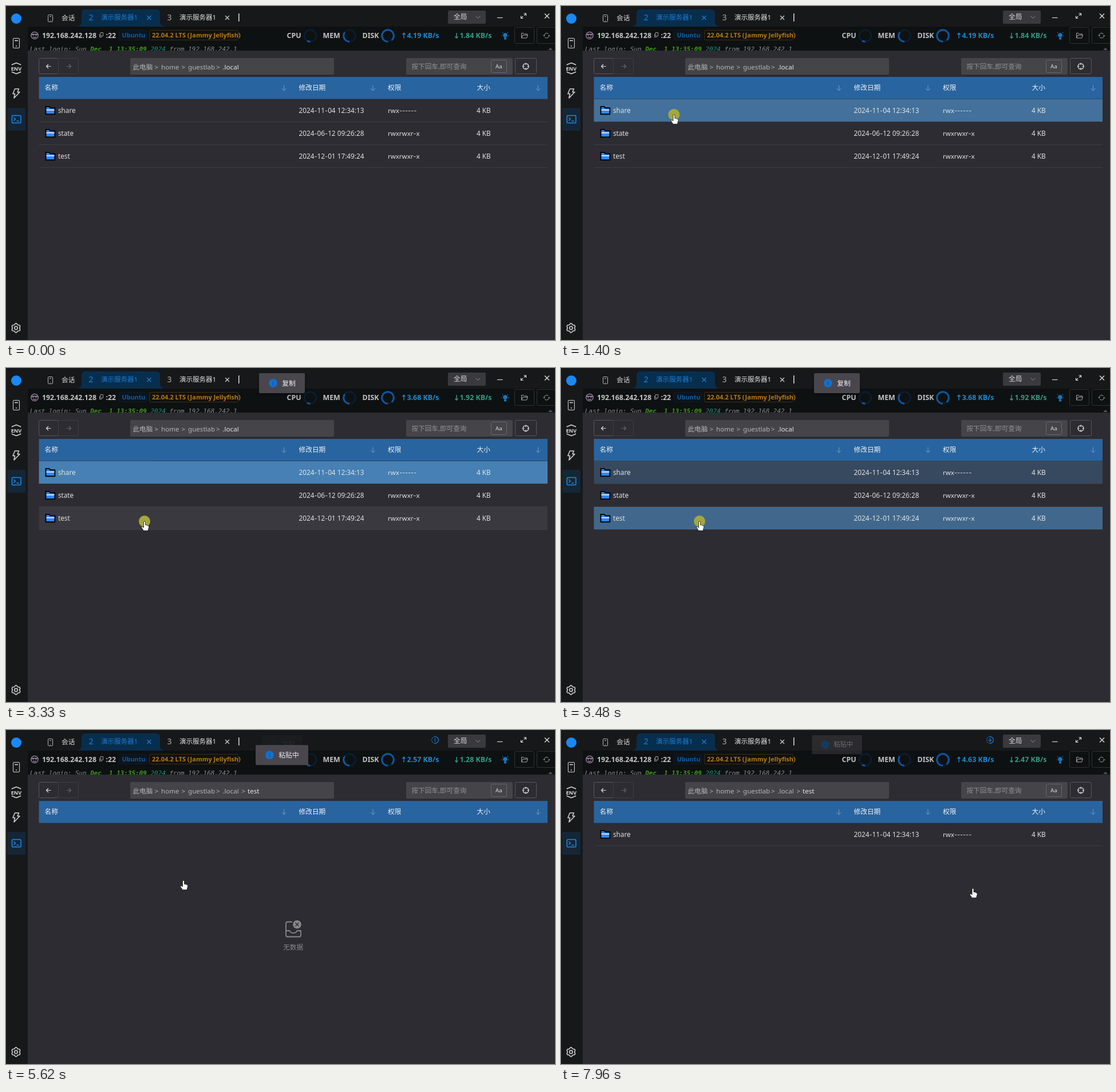
Animation of 959x584 px, one loop 8 s. Source, as an HTML page:

```html
<!DOCTYPE html>
<html lang="zh-CN">
<head>
<meta charset="utf-8">
<title>文件管理</title>
<style>
  html, body { margin: 0; width: 100%; height: 100%; overflow: hidden; background: #2d2c32; }
  svg { display: block; width: 959px; height: 584px; }
  text { font-family: "Noto Sans", "Noto Sans CJK SC", sans-serif; white-space: pre; }
  .mono { font-family: "DejaVu Sans Mono", monospace; font-style: italic; }
  .dash { font-family: Inter, sans-serif; font-size: 11px; }
</style>
</head>
<body>
<svg id="stage" viewBox="0 0 959 584"></svg>
<script>
const LOOP = 8000;
const ROW_TOP = 163, ROW_H = 40;

// Markup helpers
const rect = (x, y, w, h, fill, more = '') =>
  `<rect x="${x}" y="${y}" width="${w}" height="${h}" fill="${fill}" ${more}/>`;
const frame = (x, y, w, h, color, r = 2, fill = 'none') =>
  rect(x + .5, y + .5, w - 1, h - 1, fill, `rx="${r}" stroke="${color}"`);
const text = (x, y, s, size = 11.7, fill = '#e2e2e4', more = '') =>
  `<text x="${x}" y="${y}" font-size="${size}" fill="${fill}" ${more}>${s}</text>`;
const line = (d, color, w = 1.2, more = '') =>
  `<path d="${d}" fill="none" stroke="${color}" stroke-width="${w}" stroke-linejoin="round" ${more}/>`;
const circle = (x, y, r, fill, more = '') =>
  `<circle cx="${x}" cy="${y}" r="${r}" fill="${fill}" ${more}/>`;
const group = (id, inner, more = '') => `<g id="${id}" ${more}>${inner}</g>`;
const cross = (x, y, r, color, w = 1.2) =>
  line(`M${x - r} ${y - r}l${2 * r} ${2 * r}M${x + r} ${y - r}l${-2 * r} ${2 * r}`, color, w);
const wideDashes = s => s.replace(/-+/g, '<tspan class="dash">$&</tspan>');
const bold = 'font-weight="700"';

function gear(x, y) {
  const points = Array.from({ length: 48 }, (_, i) => {
    const a = i * Math.PI / 24, r = 7.1 + .9 * Math.cos(6 * a);
    return `${(x + r * Math.sin(a)).toFixed(2)} ${(y - r * Math.cos(a)).toFixed(2)}`;
  });
  return line(`M${points.join('L')}Z`, '#d8d8da', 1.5) +
    circle(x, y, 2.7, 'none', 'stroke="#d8d8da" stroke-width="1.5"');
}

function sidebar() {
  const ink = '#d6d6d8';
  return rect(0, 36, 38, 548, '#17181a') +
    circle(18, 22, 9, '#1989f5') +
    frame(12, 56, 12, 18, ink, 1.5) + line('M15 60.5h6M17 70h2', ink, 1.5) +
    line('M10.5 103.500v-1l7.500-3 7.500 3v1M10.500 114.500v1l7.500 3 7.500-3v-1', ink, 1.4) +
    text(18, 112.6, 'ENV', 9.2, ink, bold + ' text-anchor="middle"') +
    line('M15.500 145h7l-2.500 5.500h4L14 161l1.500-7.500h-3.500Z', ink, 1.5) +
    rect(2, 178, 32, 40, '#152636', 'rx="2"') +
    rect(10.500, 191.500, 15.500, 13, 'none', 'rx="1.5" stroke="#1d8cf0" stroke-width="1.5"') +
    line('M13.500 195l3 2.800-3 2.800M18.500 201.300h4', '#1d8cf0', 1.4) +
    gear(17.500, 563);
}

function titleBar() {
  const pale = '#d4d4d6', blue = '#1b7fd4';
  return rect(0, 0, 959, 36, '#17181a') +
    frame(73, 15, 9, 13, '#bbb', 1) + line('M76 18.500h3M77 25h1', '#bbb') +
    text(97, 25.300, '会话', 11.700, pale) +
    `<path d="M124 36Q132 35 132 27V13Q132 6 139 6H262Q269 6 269 13V27Q269 35 277 36Z" fill="#082e4e"/>` +
    text(144.500, 25, '2', 14, blue) + text(166, 24.300, '演示服务器1', 11.500, blue) + cross(250, 20.500, 3.500, blue) +
    text(281.500, 25, '3', 14, '#aaa') + text(303, 24.300, '演示服务器1', 11.500, '#e4e4e6') + cross(386.500, 20.500, 3.500, pale) +
    rect(406, 13, 1.500, 14, '#dedee0') +
    rect(772, 8, 66, 23, '#3a3a3e', 'rx="2"') + text(782, 23.300, '全局', 11.700, '#dcdcde') +
    line('M820.500 17.500l4 4 4-4', '#8c8c90', 1) +
    line('M858 20.500h9.500', pale) +
    line('M904.500 13h4v4M908.500 13l-3.500 3.500M903.500 21.500h-4v-4M899.500 21.500l3.500-3.500', pale) +
    cross(945, 17.500, 4, '#e4e4e6', 1.300);
}

function gauge(label, x, cx, share) {
  const length = 2 * Math.PI * 10.300;
  const ring = 'stroke-width="3" stroke=';
  return text(x, 55.500, label, 12.400, '#c2c4c4', bold) +
    circle(cx, 52, 10.300, 'none', ring + '"#0a1d31"') +
    circle(cx, 52, 10.300, 'none', ring + `"#0f56a0" stroke-dasharray="${share * length} ${length}" transform="rotate(90 ${cx} 52)"`);
}

function statusBar() {
  const mono = (x, s, color, more = '') => text(x, 78.500, s, 10.930, color, 'class="mono" ' + more);
  return rect(38, 36, 921, 42, '#0e1111') +
    mono(42, 'Last login: Sun', '#8b8d8c') + mono(147.200, 'Dec  1 13:35:09', '#3f9e1b', bold) +
    mono(252.500, '2024', '#16977f') + mono(285.400, 'from 192.168.242.1', '#8b8d8c') +
    circle(50, 51.500, 6.200, 'none', 'stroke="#a58bb0" stroke-width="1.3"') +
    line('M44 49.500h12M46.500 51h2M51.500 51h2M47 54q3 2.500 6 0', '#a58bb0', 1.300) +
    text(63, 55.500, '192.168.242.128', 12.300, '#c6c8c8', bold) +
    line('M163.500 49v5.500h4M165 46.500h4.500v6H165Z', '#999', 1) +
    text(174.500, 55.500, ':22', 12.300, '#c6c8c8', bold) +
    frame(197, 42, 49, 18, '#0b1c2e', 2, '#0b151e') + text(202.500, 55, 'Ubuntu', 10.800, '#105c9e', 'font-weight="600"') +
    frame(250, 42, 156, 18, '#3d2d17', 2, '#12110f') +
    text(255, 55, '22.04.2 LTS (Jammy Jellyfish)', 11, '#b57a14', 'font-weight="600"') +
    gauge('CPU', 490.500, 531.500, .09) + gauge('MEM', 553.500, 600, .35) + gauge('DISK', 622.500, 667, .88) +
    line('M695 56.500v-9M692.500 50l2.500-2.700 2.500 2.700', '#148bdb', 1.400) +
    line('M787 47v9M784.500 53.500l2.500 2.700 2.500-2.700', '#2f9e86', 1.400) +
    text(700.500, 55.500, '', 12.400, '#148bdb', bold + ' id="up"') +
    text(792.500, 55.500, '', 12.400, '#2f9e86', bold + ' id="down"') +
    circle(872, 51, 3.800, '#1477c4') + rect(870, 55, 4, 3.500, '#1477c4') +
    line('M865.500 52h1.500M877 52h1.500M867 46l1.200 1.200M877 46l-1.200 1.200', '#1477c4') +
    frame(888, 37, 35, 29, '#2e3232') + frame(927, 37, 40, 29, '#2e3232') +
    line('M900.500 56v-8.500h3.500l1.500 1.500h5v2M900.500 56l2-5h9l-2 5Z', '#a4a6a6', 1) +
    line('M940 52.500a4.300 4.300 0 0 1 7.500-3.500M948.600 51a4.300 4.300 0 0 1-7.500 3.500M938.500 51.200l1.500 1.500 1.500-1.500M947.200 52.500l1.500-1.500 1.500 1.500', '#a4a6a6', 1);
}

function toolbar() {
  const crumbs = [[221.500, '此电脑'], [259.500, '&gt;'], [271, 'home'], [306.500, '&gt;'], [318, 'guestlab'], [367, '&gt;']];
  const dim = '#b4b4b8';
  return rect(38, 78, 921, 506, '#2d2c32') + `<path d="M947 77l4-4 4 4Z" fill="#555"/>` +
    frame(57, 91, 35, 28, '#57565c') + frame(91, 91, 36, 28, '#3e3d43') +
    line('M78.500 105.500h-8M74 102l-3.500 3.500 3.500 3.500', '#dededf') +
    line('M105.500 105.500h8M110 102l3.500 3.500-3.500 3.500', '#65646a') +
    rect(217, 91, 356, 29, '#454449', 'rx="2"') +
    crumbs.map(([x, s]) => text(x, 110.500, s, 11.600, dim)).join('') +
    text(378.500, 110.500, '.local', 11.600, dim, 'id="local"') +
    group('subdir', text(411.500, 110.500, '&gt;', 11.600, dim) + text(422, 110.500, 'test', 11.600, '#e6e6e8')) +
    rect(699, 91, 186, 29, '#454449', 'rx="2"') + text(708.500, 109.500, '按下回车,即可查询', 11.600, '#929196') +
    frame(847, 94, 28, 23, '#68676d') + text(861, 109, 'Aa', 9.800, '#dededf', 'text-anchor="middle"') +
    frame(889, 91, 38, 28, '#57565c') +
    circle(908, 105.500, 4.900, 'none', 'stroke="#dededf" stroke-width="1.2"') +
    line('M908 99.500v3.500M908 108v3.500M902 105.500h3.500M910.500 105.500h3.500', '#dededf');
}

function tableHead() {
  const arrow = x => line(`M${x} 138.500v9.500M${x - 4} 144l4 4 4-4`, '#6f9cc7', 1);
  const titles = [[67.500, '名称'], [511.500, '修改日期'], [667, '权限'], [822.500, '大小']];
  return rect(57.500, 124, 888.500, 38.500, '#28649f') +
    titles.map(([x, s]) => text(x, 147.300, s, 11.700, '#f2f4f6', 'font-weight="500"')).join('') +
    [485.500, 641, 929.500].map(arrow).join('');
}

function tableRow([name, date, mode], i) {
  const y = ROW_TOP + i * ROW_H, base = y + 23.500;
  return group('row' + i,
    rect(57.500, y, 888.500, ROW_H - 1, '#3a393f', `id="hover${i}"`) +
    rect(57.500, y, 888.500, ROW_H - 1, '#4680b4', `id="pick${i}"`) +
    rect(57.500, y + ROW_H - 1, 888.500, 1, '#3d3c43') +
    `<path d="M69.500 ${y + 13}h6l2 2.300h7.800v11H69.500Z" fill="#2f88ff" stroke="#050505" stroke-width="2" stroke-linejoin="round"/>` +
    rect(70.500, y + 18, 14, 1.500, '#fff') +
    text(91, base, name, 11.700) + text(511.500, base, wideDashes(date), 11.800) +
    text(667, base, wideDashes(mode), 11.500) + text(822, base, '4 KB', 11.800));
}

function emptyNote() {
  const gray = '#88878c';
  return group('empty',
    line('M500 335.500h-8q-3 0-3 3v20q0 3 3 3h20q3 0 3-3v-8M489 351h6.500q1.500 4 6.500 4t6.500-4h6.500', gray, 1.800) +
    circle(508.500, 340, 7.300, gray) + cross(508.500, 340, 3, '#2d2c32', 1.400) +
    text(484, 384, '无数据', 11.700, gray));
}

function toast(id, label, width) {
  const left = -width / 2;
  return group(id,
    rect(left, 0, width, 35, '#48474d', 'rx="2" filter="url(#shadow)"') +
    circle(left + 24.500, 17.500, 7.300, '#1270d2') +
    rect(left + 23.800, 13.200, 1.400, 1.600, '#48474d') + rect(left + 23.800, 16, 1.400, 5.500, '#48474d') +
    text(left + 40.300, 21.500, label, 11.800, '#ececee'));
}

function downloadIcon() {
  const d = (id, path, dash) => line(path, '#1478d4', 2, `id="${id}" stroke-linecap="round" stroke-dasharray="${dash}"`);
  return group('download',
    d('solid', 'M12 3a9 9 0 0 1 0 18', '29 40') + d('dashed', 'M12 21a9 9 0 0 1 0-18', '2 4') +
    d('shaft', 'M12 8v7.5', '8 20') + d('headL', 'M12 15.5l-3.500-3.500', '6 20') + d('headR', 'M12 15.5l3.500-3.500', '6 20'),
    'transform="translate(741.7 9.6) scale(.65)"');
}

const files = [
  ['share', '2024-11-04 12:34:13', 'rwx------'],
  ['state', '2024-06-12 09:26:28', 'rwxrwxr-x'],
  ['test', '2024-12-01 17:49:24', 'rwxrwxr-x']
];

const stage = document.getElementById('stage');
stage.innerHTML =
  '<defs><filter id="shadow" x="-20%" y="-40%" width="140%" height="200%"><feDropShadow dx="0" dy="2" stdDeviation="3" flood-opacity=".35"/></filter></defs>' +
  titleBar() + sidebar() + statusBar() + toolbar() + tableHead() + files.map(tableRow).join('') + emptyNote() +
  downloadIcon() + toast('copyToast', '复制', 80) + toast('pasteToast', '粘贴中', 92) +
  circle(0, 0, 10, '#a3a73e', 'id="click"') +
  group('hand', '<path d="M-1.500 1.500Q-1.500 0 0 0T1.500 1.500V6.500Q4 5.800 4.300 7.200Q6.200 6.600 6.600 8.200Q8 8.200 7.600 10.500L6 16.500H-1.500L-5.300 11Q-5.600 9 -3.400 9.500L-1.500 11Z" fill="#fff" stroke="#111" stroke-width=".8"/>');

const el = {};
stage.querySelectorAll('[id]').forEach(node => el[node.id] = node);

// Timeline tables
const cursorPath = [
  [0, 775, 592], [70, 751, 574], [140, 655, 515], [205, 520, 425], [270, 390, 356], [340, 322, 329],
  [540, 322, 329], [700, 278, 280], [850, 222, 214], [990, 199, 185],
  [1270, 199, 185], [1430, 197, 191], [2600, 197, 191], [2880, 226, 254], [3030, 241, 275], [3130, 242, 268],
  [3600, 242, 268], [3800, 285, 331], [3940, 304, 290], [4060, 310, 263],
  [5700, 310, 263], [6050, 440, 298], [6410, 690, 312],
  [6500, 740, 310], [6850, 922, 302], [7280, 738, 291], [7500, 730, 288], [7800, 719.500, 277]
];
const clicks = [[1290, 1410], [3330, 3400], [3450, 3510], [4200, 4310]];
const rates = [[0, '4.19', '1.84'], [1830, '3.68', '1.92'], [3860, '2.57', '1.28'], [5860, '4.63', '2.47']];
const OPENED = 3510, PASTED = 6720, DOWNLOAD = 4990;
const COPY_IN = 2470, COPY_OUT = 5460, PASTE_IN = 4990, PASTE_OUT = 7880;

const ramp = (t, start, length) => Math.min(1, Math.max(0, (t - start) / length));
const easeOut = p => 1 - (1 - p) ** 2;
const show = (node, on) => node.setAttribute('visibility', on ? 'visible' : 'hidden');
const fade = (node, a) => node.setAttribute('opacity', a);

function cursorAt(t) {
  const i = cursorPath.findIndex(p => p[0] > t);
  if (i < 0) return cursorPath[cursorPath.length - 1].slice(1);
  const [t0, x0, y0] = cursorPath[i - 1], [t1, x1, y1] = cursorPath[i];
  const p = (t - t0) / (t1 - t0);
  return [x0 + (x1 - x0) * p, y0 + (y1 - y0) * p];
}

function placeToast(node, t, top, start, end) {
  const enter = easeOut(ramp(t, start, 300)), leave = ramp(t, end, 240);
  const scale = (.85 + .15 * enter) * (1 - .15 * leave);
  fade(node, enter * (1 - leave) ** 2.200);
  node.setAttribute('transform', `translate(482 ${top - 10 * (1 - enter)}) scale(${scale})`);
}

function placeDownload(t) {
  const age = t - DOWNLOAD;
  const draw = (node, length, start, time) => {
    const p = ramp(age, start, time);
    show(node, p > 0);
    node.setAttribute('stroke-dashoffset', length * (1 - p));
  };
  show(el.dashed, age >= 0);
  el.dashed.setAttribute('stroke-dashoffset', 6 * (1 - (age % 600) / 600));
  draw(el.solid, 29, 0, 300);
  draw(el.shaft, 8, 400, 200);
  draw(el.headL, 6, 660, 200);
  draw(el.headR, 6, 660, 200);
}

function render(t) {
  const [x, y] = cursorAt(t), at = `translate(${x} ${y})`;
  el.hand.setAttribute('transform', at);
  el.click.setAttribute('transform', at);
  show(el.click, clicks.some(([a, b]) => t >= a && t < b));

  const opened = t >= OPENED, pasted = t >= PASTED;
  const hovered = Math.floor((y - ROW_TOP) / ROW_H);
  const swap = ramp(t, 3363, 180);
  const picks = [opened ? 0 : ramp(t, 1290, 140) * (1 - swap), 0, swap];
  files.forEach((_, i) => {
    el['row' + i].style.display = !opened || (pasted && i === 0) ? '' : 'none';
    fade(el['hover' + i], hovered === i ? 1 : 0);
    fade(el['pick' + i], picks[i]);
  });
  show(el.empty, opened && !pasted);
  show(el.subdir, opened);
  el.local.setAttribute('fill', opened ? '#b4b4b8' : '#e6e6e8');

  const [, up, down] = rates.filter(r => r[0] <= t).pop();
  el.up.textContent = up + ' KB/s';
  el.down.textContent = down + ' KB/s';

  placeToast(el.copyToast, t, 9, COPY_IN, COPY_OUT);
  placeToast(el.pasteToast, t, 59 - 50 * easeOut(ramp(t, COPY_OUT, 390)), PASTE_IN, PASTE_OUT);
  placeDownload(t);
}

const began = performance.now();
function tick() {
  render((performance.now() - began) % LOOP);
  requestAnimationFrame(tick);
}
tick();
</script>
</body>
</html>
```
